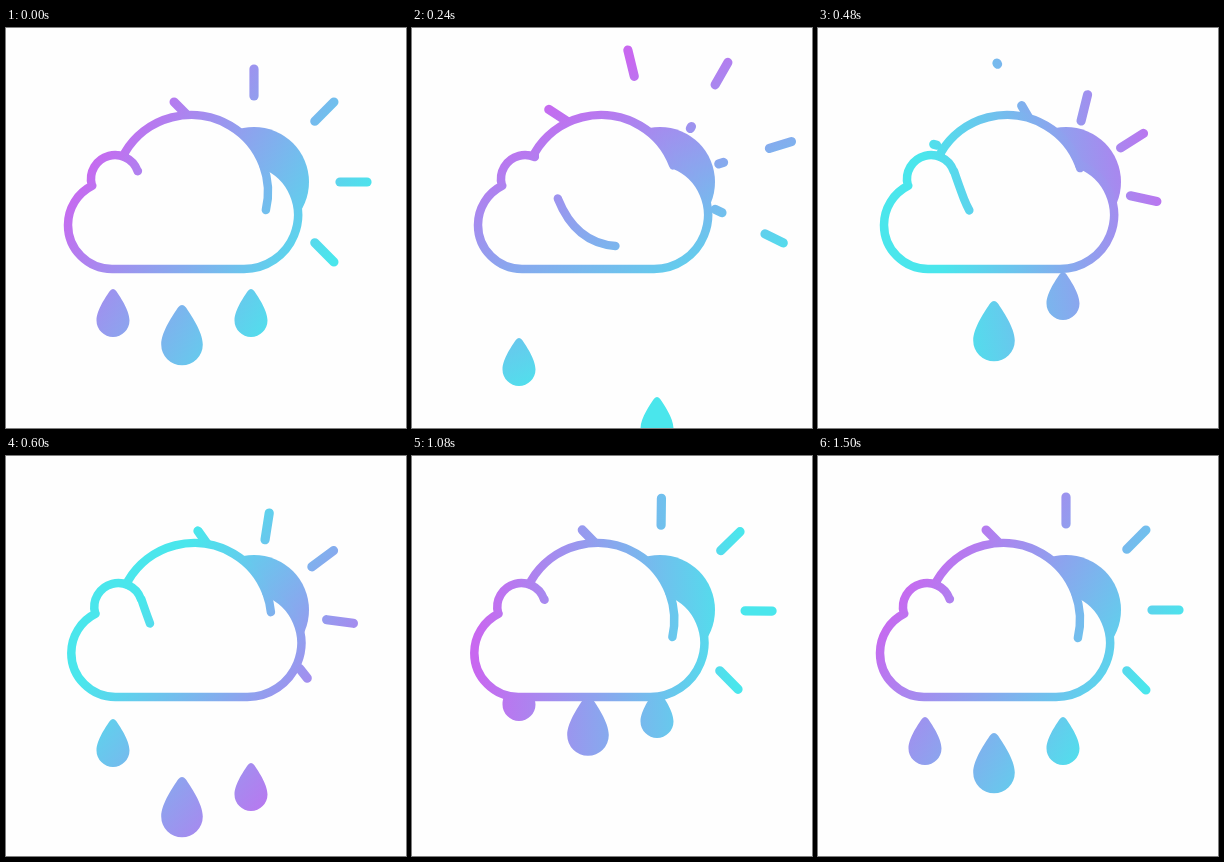
Write an HTML page with a canvas that moves like this. It is 400 by 400 pixels and loops after 2.53 s.

```html
<!DOCTYPE html>
<html lang="en">
<head>
<meta charset="utf-8">
<title>Sun, cloud and rain</title>
<style>
  html, body { margin: 0; height: 100%; overflow: hidden; background: #fefefe; }
  canvas { display: block; }
</style>
</head>
<body>
<canvas id="stage" width="400" height="400"></canvas>
<script>
const ctx = document.getElementById('stage').getContext('2d');
const LOOP = 2530, MOVE = 1500, STEP = 30;
const PAPER = '#fefefe';
const rad = deg => deg * Math.PI / 180;

// Smooth curve through values at these moments, at rest on both ends
const KEYS = [0, 240, 480, 600, 840, 1080, 1500];
function curve(values, t) {
  const last = KEYS.length - 1;
  const slope = i => i === 0 || i === last ? 0
    : (values[i + 1] - values[i - 1]) / (KEYS[i + 1] - KEYS[i - 1]);
  let i = 0;
  while (i < last - 1 && t >= KEYS[i + 1]) i++;
  const span = KEYS[i + 1] - KEYS[i], u = (t - KEYS[i]) / span;
  const h = u * u * (3 - 2 * u);
  return values[i] * (1 - h) + values[i + 1] * h
    + span * u * (1 - u) * (slope(i) * (1 - u) - slope(i + 1) * u);
}

const TURN = [0, 31, 138, 186, 284, 330, 360];
const SWAY = [0, 4, 4, 3.3, 1.3, 0.3, 0];
const FLOW = [0, 155.6, 221.6, 238, 255.6, 263, 264];
const FALL = 260;
const DROPS = [
  { x: 107, y: 261, size: 1, path: [0, 49, 178, 262, 404, 476, 520] },
  { x: 176, y: 277, size: 1.26, path: [0, 130, 256, 304, 396, 482.5, 520] },
  { x: 245, y: 261, size: 1, path: [0, 108, 243, 306, 408, 493, 520] }
];
const SUN = { x: 248, y: 154, r: 55 };

function makeInk(t) {
  const a = rad(32 + curve(TURN, t)), c = Math.cos(a), s = Math.sin(a);
  const ink = ctx.createLinearGradient(220 - 156 * c, 205 - 156 * s, 220 + 104 * c, 205 + 104 * s);
  ink.addColorStop(0, '#c868f0');
  ink.addColorStop(1, '#4ae6ec');
  return ink;
}

function rayProgress(t) {
  if (t <= 0) return 0;
  const soft = t < 52 ? t * t / 104 : t - 26;
  return 1 - Math.max(0, 1 - soft / 1546) ** 4;
}

function ray(angle, from, to) {
  from = Math.max(from, 61.5);
  to = Math.min(to, 137.5);
  if (from >= to) return;
  const c = Math.cos(angle), s = Math.sin(angle);
  ctx.beginPath();
  ctx.moveTo(SUN.x + from * c, SUN.y + from * s);
  ctx.lineTo(SUN.x + to * c, SUN.y + to * s);
  ctx.stroke();
}

function drawSun(t) {
  ctx.lineWidth = 9.2;
  for (let k = 0; k < 6; k++) {
    const p = rayProgress(t - (5 - k) * 20);
    const angle = rad(-135 + 45 * (k - p)), out = 75 * p;
    // The last ray is new and grows while it turns into view
    const grow = k < 5 ? 1 : Math.max(0, 1 - 3.5 * (1 - p));
    if (k < 5) ray(angle, 86 + out, 113 + out);
    if (grow) ray(angle, 11 + out, 11 + out + 27 * grow);
  }
  ctx.beginPath();
  ctx.arc(SUN.x, SUN.y, SUN.r, 0, 7);
  ctx.fill();
}

function drawDrop({ x, y, size, path }, t) {
  const top = y + (curve(path, t) + 100) % FALL - 100;
  const px = v => x + v * size, py = v => top + v * size;
  ctx.beginPath();
  ctx.moveTo(px(-3), py(1.8));
  ctx.quadraticCurveTo(px(0), py(-1.8), px(3), py(1.8));
  ctx.bezierCurveTo(px(6.5), py(7), px(16.5), py(21), px(16.5), py(31.4));
  ctx.arc(x, py(31.4), 16.5 * size, 0, Math.PI);
  ctx.bezierCurveTo(px(-16.5), py(21), px(-6.5), py(7), px(-3), py(1.8));
  ctx.fill();
}

function drawCloud(t) {
  ctx.save();
  ctx.translate(curve(SWAY, t), 0);
  ctx.lineWidth = 8.5;

  ctx.beginPath();
  ctx.arc(185, 164, 77, rad(-149.4), rad(-20.3));
  ctx.arc(238, 187, 54, rad(-68), rad(90));
  ctx.arc(106, 197, 44, rad(90), rad(243.4));
  ctx.arc(109, 151, 24, rad(165.4), rad(294));
  ctx.closePath();
  ctx.fillStyle = PAPER;
  ctx.fill();
  ctx.stroke();

  // Inner line: one dash runs from the big arc through the cloud to the small bump
  ctx.setLineDash([79, 185]);
  ctx.lineDashOffset = 33.6 - curve(FLOW, t);
  ctx.beginPath();
  ctx.arc(185, 164, 77, rad(-20.3), rad(13.5));
  ctx.bezierCurveTo(255, 204, 232, 220, 200, 218);
  ctx.bezierCurveTo(170, 216, 152, 196, 142, 171);
  ctx.bezierCurveTo(139, 163, 135, 152, 132, 143);
  ctx.arc(109, 151, 24, rad(-19), rad(-66), true);
  ctx.stroke();
  ctx.restore();
}

function draw(now) {
  const t = Math.min(Math.floor(now % LOOP / STEP) * STEP, MOVE);
  ctx.fillStyle = PAPER;
  ctx.fillRect(0, 0, 400, 400);
  ctx.fillStyle = ctx.strokeStyle = makeInk(t);
  ctx.lineCap = ctx.lineJoin = 'round';
  drawSun(t);
  DROPS.forEach(drop => drawDrop(drop, t));
  drawCloud(t);
}

const start = performance.now();
function tick() {
  draw(performance.now() - start);
  requestAnimationFrame(tick);
}
tick();
</script>
</body>
</html>
```
